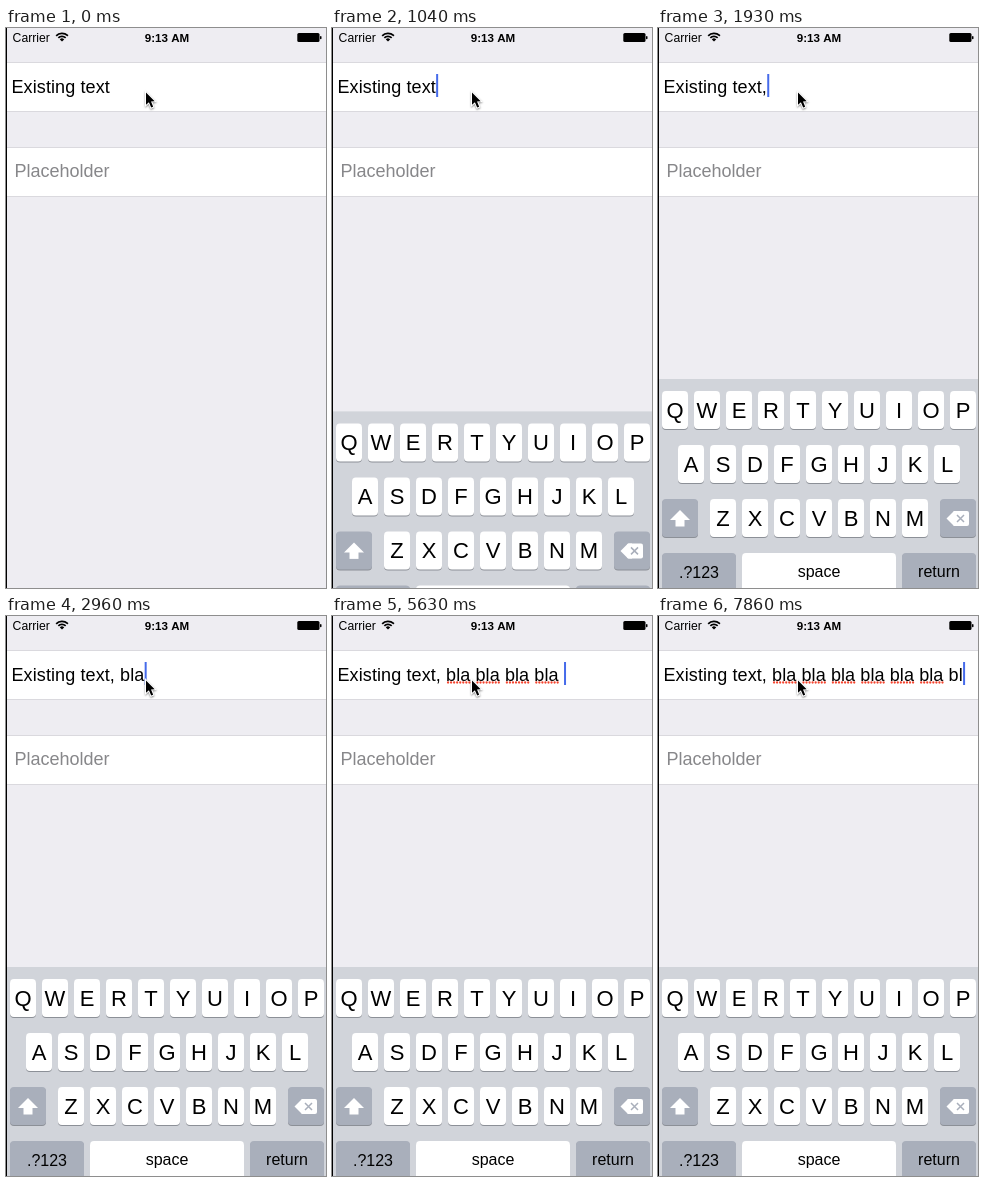
Write an HTML page with a canvas that moves like this. It is 320 px wide and 560 px high and loops after 8 s.

```html
<!DOCTYPE html>
<html lang="en">
<head>
<meta charset="utf-8">
<title>Typing into a text field</title>
<style>
  html, body { margin: 0; width: 100%; height: 100%; overflow: hidden; background: #eeedf2; }
  canvas { display: block; }
</style>
</head>
<body>
<canvas id="stage" width="320" height="560"></canvas>
<script>
const ctx = document.getElementById('stage').getContext('2d');
const FAMILY = '"Liberation Sans", Arial, sans-serif';
const KEY_GREY = '#a9afbb';
const LOOP = 8000;
const TICK = LOOP / 54;
const FOCUS_TICK = 6;
const TYPING_TICK = 13;
const TEXT_X = 5.5;
const INITIAL_TEXT = 'Existing text';
// One character per tick; an underscore is a tick of hesitation
const TYPING = ', _b_l_a_ _bl_a_ bla _bla b_la _bla__ b_l';

const clamp = value => Math.max(0, Math.min(1, value));

function typedText(tick) {
  const strokes = Math.max(0, tick - TYPING_TICK + 1);
  return INITIAL_TEXT + TYPING.slice(0, strokes).replaceAll('_', '');
}

// Rests after focus, then fades out until typing begins
function caretAlpha(tick) {
  if (tick < FOCUS_TICK) return 0;
  return tick >= TYPING_TICK ? 1 : clamp((11 - tick) / 2);
}

// Critically damped spring
function keyboardTop(tick) {
  const phase = Math.max(0, tick * TICK - 868) * 0.0197;
  return 351 + 209 * (1 + phase) * Math.exp(-phase);
}

function rect(x, y, w, h, color) {
  ctx.fillStyle = color;
  ctx.fillRect(x, y, w, h);
}

function roundRect(x, y, w, h, r, color) {
  ctx.fillStyle = color;
  ctx.beginPath();
  ctx.roundRect(x, y, w, h, r);
  ctx.fill();
}

function polygon(points, color) {
  ctx.beginPath();
  points.forEach(([x, y]) => ctx.lineTo(x, y));
  ctx.closePath();
  ctx.fillStyle = color;
  ctx.fill();
}

function text(string, x, y, size, color = '#000', align = 'left', weight = '') {
  ctx.font = `${weight} ${size}px ${FAMILY}`;
  ctx.textAlign = align;
  ctx.fillStyle = color;
  ctx.fillText(string, x, y);
}

function drawStatusBar() {
  text('Carrier', 6.6, 13.5, 12.2);
  text('9:13 AM', 161, 13.5, 11.6, '#000', 'center', 'bold');

  // Wi-Fi: a wedge and two arcs
  const from = -Math.PI * 0.76, to = -Math.PI * 0.24;
  ctx.strokeStyle = '#000';
  ctx.lineWidth = 1.7;
  for (const radius of [5, 8]) {
    ctx.beginPath();
    ctx.arc(56, 13.3, radius, from, to);
    ctx.stroke();
  }
  ctx.beginPath();
  ctx.moveTo(56, 13.5);
  ctx.arc(56, 13.5, 3, from, to);
  ctx.fill();

  // Battery
  roundRect(291.3, 5, 22.2, 9, 1.5, '#000');
  roundRect(314, 8, 1.5, 3.2, 0.7, '#000');
}

function drawField(y) {
  rect(0, y - 1, 320, 50, '#dad9de');
  rect(0, y, 320, 48, '#fff');
}

function drawTypedText(tick) {
  const typed = typedText(tick);
  ctx.letterSpacing = '0.1px';
  text(typed, TEXT_X, 65, 18);
  const endOf = count => TEXT_X + ctx.measureText(typed.slice(0, count)).width;

  // Dotted spelling marks under each finished word
  ctx.fillStyle = '#f4452f';
  for (const match of typed.matchAll(/bla /g)) {
    const start = endOf(match.index) + 2;
    for (let i = 0; i < 8; i++) {
      ctx.beginPath();
      ctx.arc(start + i * 3.05, 66.5, 1.15, 0, Math.PI * 2);
      ctx.fill();
    }
  }

  ctx.globalAlpha = caretAlpha(tick);
  rect(endOf(typed.length) + 0.3, 46, 2, 23, '#466bea');
  ctx.globalAlpha = 1;
  ctx.letterSpacing = '0px';
}

function drawKey(x, y, w, color = '#fff') {
  roundRect(x, y + 1, w, 38, 4, '#8c9097');
  roundRect(x, y, w, 38, 4, color);
}

function drawLetters(letters, x, y) {
  [...letters].forEach((letter, i) => {
    drawKey(x + i * 32, y, 26);
    text(letter, x + i * 32 + 13, y + 27, 22, '#000', 'center');
  });
}

function drawWideKey(label, x, w, baseline, color) {
  drawKey(x, 174, w, color);
  text(label, x + w / 2, baseline, 16, '#000', 'center');
}

function drawShiftKey() {
  drawKey(4, 120, 36, KEY_GREY);
  polygon([[22, 131], [32, 141], [12, 141]], '#fff');
  rect(17.5, 140, 9, 7.5, '#fff');
}

function drawDeleteKey() {
  drawKey(282, 120, 36, KEY_GREY);
  polygon([[288.5, 139.5], [296, 132], [300, 132], [300, 147], [296, 147]], '#fff');
  roundRect(295, 132, 16, 15, 2, '#fff');
  ctx.strokeStyle = KEY_GREY;
  ctx.lineWidth = 1.5;
  ctx.beginPath();
  for (const slope of [1, -1]) {
    ctx.moveTo(299, 139.5 - 3.5 * slope);
    ctx.lineTo(306, 139.5 + 3.5 * slope);
  }
  ctx.stroke();
}

function drawKeyboard(top) {
  ctx.save();
  ctx.translate(0, top);
  rect(0, 0, 320, 210, '#d1d4da');
  drawLetters('QWERTYUIOP', 4, 12);
  drawLetters('ASDFGHJKL', 20, 66);
  drawLetters('ZXCVBNM', 52, 120);
  drawShiftKey();
  drawDeleteKey();
  drawWideKey('.?123', 4, 74, 199, KEY_GREY);
  drawWideKey('space', 84, 154, 198);
  drawWideKey('return', 244, 74, 198, KEY_GREY);
  ctx.restore();
}

function drawPointer() {
  const arrow = [[0, 0], [0, 12.4], [2.9, 9.8], [5.2, 15.2], [7.2, 14.3], [5, 9.1], [8.7, 8.8]]
    .map(([x, y]) => [140 + x, 64.4 + y]);
  ctx.save();
  ctx.shadowColor = 'rgba(0, 0, 0, 0.4)';
  ctx.shadowBlur = 2;
  ctx.shadowOffsetY = 1;
  polygon(arrow, '#fff');
  ctx.strokeStyle = '#fff';
  ctx.lineWidth = 2;
  ctx.stroke();
  ctx.restore();
  polygon(arrow, '#000');
}

function draw(now) {
  const tick = Math.floor((now % LOOP + 8) / TICK) % 54;
  rect(0, 0, 320, 560, '#eeedf2');
  drawStatusBar();
  drawField(35);
  drawField(120);
  drawTypedText(tick);
  text('Placeholder', 8.4, 149, 18, '#87878a');
  drawKeyboard(keyboardTop(tick));
  drawPointer();
  rect(0, 0, 1, 560, '#000');
  requestAnimationFrame(draw);
}

draw(0);
</script>
</body>
</html>
```
